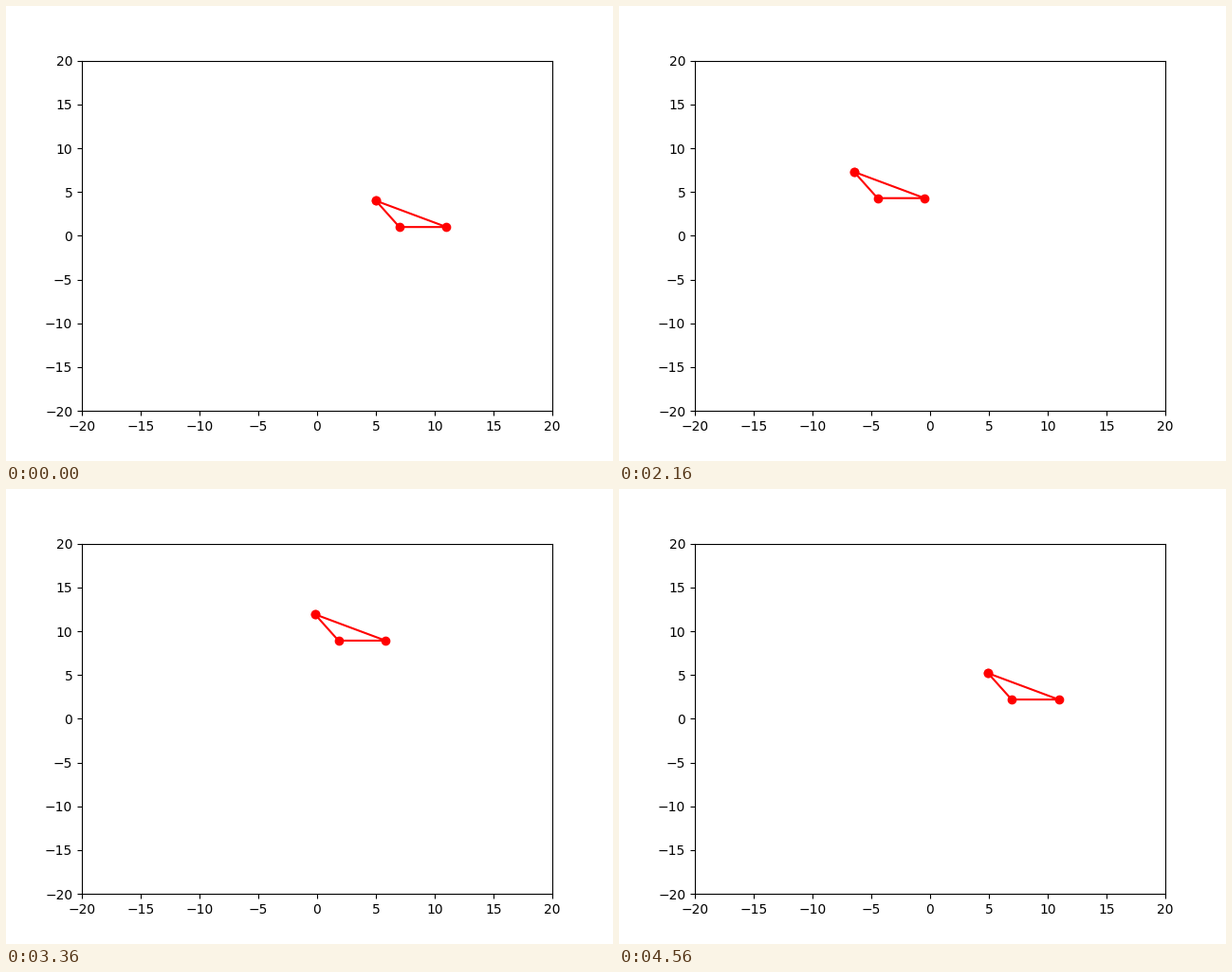
These frames come from a looping animation (640 by 480 pixels, 4.8 s). A matplotlib script:

```python
import numpy as np
import matplotlib.pyplot as plt
from matplotlib.animation import FuncAnimation

FRAMES = 20
INTERVAL = 240

# Closed triangle, relative to the centre of its elliptical path
TRIANGLE = np.array([[-1, 4], [1, 1], [5, 1], [-1, 4]])
RADII = np.array([6, 8])

fig, ax = plt.subplots(figsize=(6.4, 4.8), dpi=100)
ax.set_xlim(-20, 20)
ax.set_ylim(-20, 20)
line, = ax.plot([], [], "ro-")


def update(i):
    # One radian per step
    offset = RADII * [np.cos(i), np.sin(i)]
    line.set_data(*(TRIANGLE + offset).T)
    return line,


anim = FuncAnimation(fig, update, frames=FRAMES, interval=INTERVAL,
                     repeat=True, repeat_delay=0)
plt.show()
```
